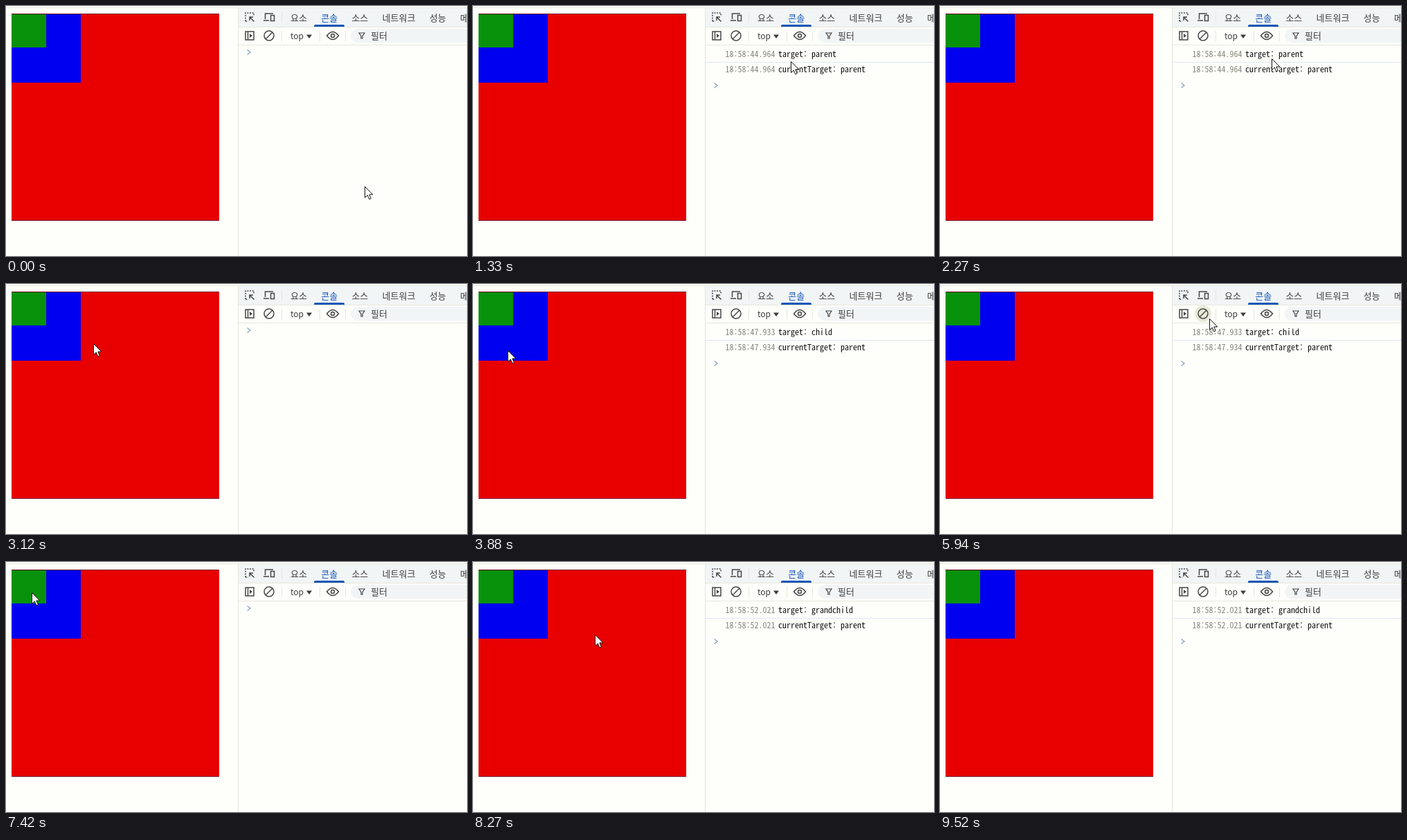
These frames come from a looping animation (666x362 px, 9560 ms). An HTML page:

```html
<!DOCTYPE html>
<html lang="ko">
<head>
<meta charset="utf-8">
<title>Event target</title>
<style>
html, body { margin: 0; width: 100%; height: 100%; overflow: hidden; background: #fefefa; }
svg { display: block; width: 666px; height: 362px; }
text { font: 13px "Noto Sans CJK KR", "Noto Sans CJK", sans-serif; fill: #3c3c3c; white-space: pre; }
.log text { font: 12px "Noto Sans Mono CJK KR", "Noto Sans Mono CJK JP", "Noto Sans Mono", monospace; fill: #111; }
.log .time { fill: #86867c; }
.icon { fill: none; stroke: #454545; stroke-width: 1.5; }
.rule { fill: none; stroke: #e6e7dc; }
.bar { fill: #f2f5f6; }
</style>
</head>
<body>
<svg viewBox="0 0 666 362">
  <rect width="666" height="362" fill="#fefefa"/>
  <path class="rule" d="M0 2.5H666"/>
  <rect x="8" y="11" width="300" height="300" fill="#e80000"/>
  <rect x="8" y="11" width="100" height="100" fill="#0000f0"/>
  <rect x="8" y="11" width="50" height="49" fill="#08910a"/>
  <path d="M8 11.5H308M8 310.5H308" stroke="#70001c"/>

  <rect class="bar" x="336" y="3" width="330" height="27"/>
  <path class="rule" d="M335.5 3V362M336 30.5H666M336 56.5H666"/>
  <path class="rule" d="M398.5 9V24M398.5 36V51M453.5 36V51M490.5 36V51"/>
  <rect class="bar" x="498" y="33" width="190" height="20" rx="10"/>
  <path d="M445 30v-1q0-2 2-2h40q2 0 2 2v1z" fill="#1456b8"/>
  <g id="tabs"></g>
  <circle id="hover" cx="380" cy="43" r="12" fill="#e8e9d8"/>

  <g class="icon">
    <path d="M346 22V10H358V14M346 22H350" stroke-dasharray="2 1.6"/>
    <path d="M358.5 22.5L352.5 16.5M352 21V16H357"/>
    <path d="M374.5 19V11H386M372 21H380"/>
    <rect x="382.5" y="13.5" width="5" height="8"/>
    <rect x="346" y="37" width="12" height="12"/>
    <path d="M349.5 37V49"/>
    <path d="M352 40L356 43L352 46Z" fill="#454545" stroke="none"/>
    <circle cx="380" cy="43" r="7"/>
    <path d="M375 48L385 38"/>
    <path d="M463.5 43Q472 32 480.5 43Q472 54 463.5 43Z"/>
    <circle cx="472" cy="43" r="2.5"/>
    <path d="M510 39H518L515 43.5V47H513V43.5Z" stroke-width="1.2"/>
  </g>
  <text x="411" y="47.5" style="font-size:12px">top</text>
  <path d="M434 41.5H442L438 47Z" fill="#3c3c3c"/>
  <text x="527" y="47.5">필터</text>

  <g id="log" class="log">
    <path d="M336 81.5H666" stroke="#dfe6f4"/>
    <text class="time" x="364.5" y="74"></text><text x="441" y="74"></text>
    <text class="time" x="364.5" y="96"></text><text x="441" y="96"></text>
  </g>
  <path id="prompt" d="M348.5 -3.5L353 0L348.5 3.5" fill="none" stroke="#86a0c4" stroke-width="1.3"/>
  <path id="cursor" d="M.5.5V16.5L4.3 13L6.8 18.8L9.3 17.7L6.8 12H11.8Z" fill="#fffffa" stroke="#111"/>
</svg>
<script>
const LOOP = 9560, CURSOR_GONE = 9510, CLOCK = 44124;
const $ = id => document.getElementById(id);

let tabX = 411;
$("tabs").innerHTML = ["요소", "콘솔", "소스", "네트워크", "성능", "메모리"].map(name => {
  const color = name === "콘솔" ? "#1456b8" : "#3c3c3c";
  const tab = `<text x="${tabX}" y="21.5" style="fill:${color}">${name}</text>`;
  tabX += name.length * 12 + 20.2;
  return tab;
}).join("");

// An entry stays from the click until the console is cleared.
const logs = [
  { word: "parent", click: 840, clear: 2760, lag: 0 },
  { word: "child", click: 3809, clear: 6090, lag: 1 },
  { word: "grandchild", click: 7897, clear: LOOP, lag: 0 }
];

const lineEnd = [546, 96], clearButton = [389, 50];
const moves = [
  { by: 700, over: 700, to: [215, 170] },
  { by: 1330, over: 430, to: [459, 80] },
  { by: 1800, over: 440, to: lineEnd },
  { by: 2600, over: 600, to: clearButton },
  { by: 3225, over: 340, to: [50, 96] },
  { by: 4580, over: 560, to: [420, 77] },
  { by: 5050, over: 440, to: lineEnd },
  { by: 5750, over: 600, to: clearButton },
  { by: 7420, over: 1250, to: [37, 44] },
  { by: 8740, over: 760, to: [460, 229] },
  { by: 9460, over: 700, to: [640, 44] }
];

const clamp = u => Math.max(0, Math.min(1, u));
const ease = u => u * u * (3 - 2 * u);

function pointer(t) {
  return moves.reduce((p, { by, over, to }) => {
    const k = ease(clamp(1 + (t - by) / over));
    return p.map((v, i) => v + (to[i] - v) * k);
  }, [518, 261]).map(Math.round);
}

const stamp = ms => "18:58:" + ((CLOCK + ms) / 1000).toFixed(3);
const show = (el, on) => el.setAttribute("visibility", on ? "visible" : "hidden");
const lines = $("log").querySelectorAll("text");

function draw(t) {
  const [x, y] = pointer(t);
  $("cursor").setAttribute("transform", `translate(${x} ${y})`);
  show($("cursor"), t < CURSOR_GONE);
  show($("hover"), Math.hypot(x - 380, y - 43) < 14);

  const log = logs.find(l => t >= l.click && t < l.clear);
  show($("log"), log);
  $("prompt").setAttribute("transform", `translate(0 ${log ? 115 : 67})`);
  if (log) {
    [stamp(log.click), "target: " + log.word, stamp(log.click + log.lag), "currentTarget: parent"]
      .forEach((s, i) => lines[i].textContent = s);
  }
}

const start = performance.now();
function tick() {
  draw((performance.now() - start) % LOOP);
  requestAnimationFrame(tick);
}
tick();
</script>
</body>
</html>
```
